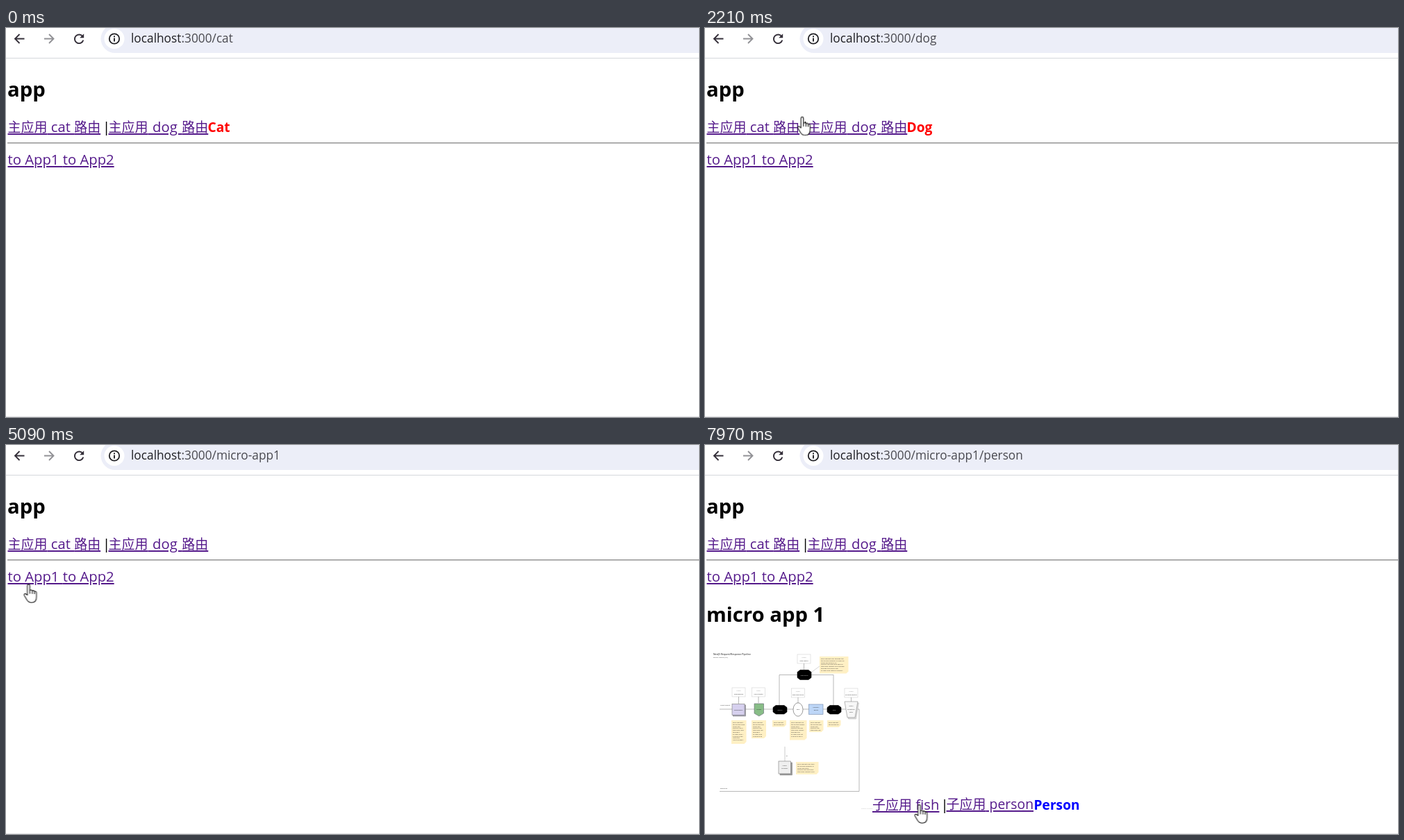
Write an HTML page that moves like this. It is 998x561 px and loops after 8000 ms.

```html
<!DOCTYPE html>
<html lang="zh-CN">
<head>
<meta charset="utf-8">
<title>micro app routes</title>
<style>
html, body { margin: 0; width: 100%; height: 100%; overflow: hidden; background: #fff; }
body { position: relative; color: #000; font-family: "Open Sans", "Noto Sans CJK SC", "Noto Sans CJK", sans-serif; }
svg { position: absolute; left: 0; top: 0; overflow: visible; }

/* --x is the left edge, --y the baseline */
.t {
  position: absolute; margin: 0; white-space: pre; line-height: 0;
  left: calc(var(--x) * 1px); top: calc(var(--y) * 1px - .388em);
  font-size: 20.3px; font-weight: 400;
}
.t i { font-style: normal; font-size: 19px; line-height: 0; }
.t a { color: #551a8b; text-decoration: underline 2px; text-underline-offset: 1.5px; }
h2.t { font-size: 29.3px; font-weight: 700; }
.url { --x: 180; --y: 22; font-size: 17.3px; color: #4a4a50; }
.url b { font-weight: 400; color: #1f1f23; }
.page { font-size: 19.2px; font-weight: 700; }
.red { color: #f00; }
.blue { color: #00f; }

.cat, .dog, .micro, .fish, .person, .child, a, #cursor, #cursor * { animation: 8s step-end infinite; }
.cat { animation-name: cat; }
.dog { animation-name: dog; }
.micro { animation-name: micro; }
.fish { animation-name: fish; }
.person { animation-name: person; }
.child { animation-name: child; }
#to-cat { animation-name: press-cat; }
#to-dog { animation-name: press-dog; }
#to-app1 { animation-name: press-app1; }
#to-person { animation-name: press-person; }

@keyframes cat { 0%, 33.6% { opacity: 1 } 24.05%, 46.1%, 100% { opacity: 0 } }
@keyframes dog { 0%, 33.6%, 59.6%, 100% { opacity: 0 } 24.05%, 46.1% { opacity: 1 } }
@keyframes micro { 0%, 67%, 100% { opacity: 0 } 59.6% { opacity: 1 } }
@keyframes fish { 0%, 95%, 100% { opacity: 0 } 67% { opacity: 1 } }
@keyframes person { 0% { opacity: 0 } 95%, 100% { opacity: 1 } }
@keyframes child { 0% { opacity: 0 } 65.3%, 100% { opacity: 1 } }
@keyframes press-cat { 31.8% { color: #f00 } 0%, 33.6%, 100% { color: #551a8b } }
@keyframes press-dog { 23.2%, 45.2% { color: #f00 } 0%, 24.05%, 46.1%, 100% { color: #551a8b } }
@keyframes press-app1 { 57.85% { color: #f00 } 0%, 59.6%, 100% { color: #551a8b } }
@keyframes press-person { 94.1% { color: #f00 } 0%, 95%, 100% { color: #551a8b } }

#cursor { position: absolute; left: 0; top: 0; animation-name: roam; }
#cursor .hand { animation-name: hand; }
#cursor .arrow { animation-name: arrow; }
@keyframes hand { 0%, 39%, 48%, 74.5%, 100% { opacity: 0 } 9.8%, 41.5%, 51.5%, 84.6% { opacity: 1 } }
@keyframes arrow { 0%, 39%, 48%, 74.5%, 100% { opacity: 1 } 9.8%, 41.5%, 51.5%, 84.6% { opacity: 0 } }
@keyframes roam {
  0% { opacity: 0; transform: translate(918px, 545px) }
  1.6% { opacity: 1; transform: translate(918px, 545px); animation-timing-function: steps(3) }
  4.35% { opacity: 1; transform: translate(330px, 240px); animation-timing-function: steps(3) }
  7.075% { opacity: 1; transform: translate(70px, 105px); animation-timing-function: steps(3) }
  9.8% { opacity: 1; transform: translate(35px, 125px); animation-timing-function: steps(2) }
  11.6% { transform: translate(60.5px, 142px) }
  12.5% { transform: translate(68.5px, 144px) }
  15.7% { transform: translate(72px, 144px); animation-timing-function: steps(4) }
  19.05% { transform: translate(136px, 144px); animation-timing-function: steps(4) }
  22.4% { transform: translate(178.5px, 139px) }
  25.85% { transform: translate(160px, 132px); animation-timing-function: steps(2) }
  27.85% { transform: translate(120px, 125px); animation-timing-function: steps(2) }
  29.85% { transform: translate(66.5px, 139px) }
  36.1% { transform: translate(75px, 143px); animation-timing-function: steps(2) }
  37.69% { transform: translate(92.5px, 146px); animation-timing-function: steps(3) }
  40.2% { transform: translate(150px, 172px); animation-timing-function: steps(3) }
  42.7% { transform: translate(187px, 150px) }
  47.2% { transform: translate(187px, 150px); animation-timing-function: steps(6) }
  52.81% { transform: translate(57.5px, 189px); animation-timing-function: steps(3) }
  55.2% { transform: translate(35.5px, 199px) }
  56.1% { transform: translate(32.5px, 201px) }
  74.5% { transform: translate(58px, 193px); animation-timing-function: steps(2) }
  76.06% { transform: translate(125px, 230px); animation-timing-function: steps(5) }
  80.45% { transform: translate(382px, 400px); animation-timing-function: steps(4) }
  83.85% { transform: translate(313px, 506px); animation-timing-function: steps(3) }
  86.35% { transform: translate(305.5px, 519px) }
  90.44% { transform: translate(326.5px, 519px); animation-timing-function: steps(3) }
  93.2% { transform: translate(400px, 518px) }
  96% { transform: translate(385px, 518px); animation-timing-function: steps(4) }
  99.56%, 100% { opacity: 1; transform: translate(308.5px, 519px) }
}
</style>
</head>
<body>
<svg width="998" height="561" fill="none">
  <path d="M998-5H157a20.5 20.5 0 0 0 0 41H998z" fill="#eceef8"/>
  <path d="M0 43.5H998" stroke="#d5d7dc"/>
  <path d="M0 560.5H998" stroke="#e4e4e6"/>
  <path d="M2 165.5H998" stroke="#939393"/>
  <path d="M2 166.5H998" stroke="#cacaca"/>
  <g stroke-width="1.9">
    <path d="M26.5 15.5H13.5M19.5 9l-6.5 6.5 6.5 6.5" stroke="#35303a"/>
    <path d="M55 15.5H68M62 9l6.5 6.5-6.5 6.5" stroke="#929296"/>
    <path d="M110.3 12.1a6.3 6.3 0 1 0 1 5.4" stroke="#35303a"/>
    <path d="M112.2 8.3v6h-6z" fill="#35303a"/>
  </g>
  <circle cx="156" cy="15.5" r="14.5" fill="#fff"/>
  <circle cx="156" cy="15.5" r="7.2" stroke="#202024" stroke-width="1.8"/>
  <path d="M156 14.5v5M156 11.2v2" stroke="#202024" stroke-width="1.9"/>
</svg>

<p class="t url cat"><b>localhost</b>:3000/cat</p>
<p class="t url dog"><b>localhost</b>:3000/dog</p>
<p class="t url micro"><b>localhost</b>:3000/micro-app1</p>
<p class="t url fish"><b>localhost</b>:3000/micro-app1/fish</p>
<p class="t url person"><b>localhost</b>:3000/micro-app1/person</p>

<h2 class="t" style="--x:2;--y:99">app</h2>
<p class="t" style="--x:2.5;--y:150"><a id="to-cat"><i>主应用</i> cat <i>路由</i></a></p>
<p class="t" style="--x:139;--y:150">|</p>
<p class="t" style="--x:147.5;--y:150;word-spacing:1.2px"><a id="to-dog"><i>主应用</i> dog <i>路由</i></a></p>
<p class="t page red cat" style="--x:290.5;--y:150">Cat</p>
<p class="t page red dog" style="--x:290.5;--y:150">Dog</p>
<p class="t" style="--x:2.5;--y:197"><a id="to-app1">to App1 </a><a>to App2</a></p>

<div class="child">
  <h2 class="t" style="--x:2;--y:255">micro app 1</h2>
  <svg id="chart" width="998" height="561" fill="none"></svg>
  <p class="t" style="--x:241;--y:526"><a><i>子应用</i> fish</a></p>
  <p class="t" style="--x:339.5;--y:526">|</p>
  <p class="t" style="--x:347.5;--y:526;font-size:19.4px"><a id="to-person"><i>子应用</i> person</a></p>
</div>
<p class="t page blue fish" style="--x:473.5;--y:526">Fish</p>
<p class="t page blue person" style="--x:473.5;--y:526">Person</p>

<svg id="cursor" width="30" height="30" fill="#fff" stroke="#111" stroke-width="1.1" stroke-linejoin="round">
  <path class="arrow" d="M.6.6V19l4.2-4 3.3 8.4 3.2-1.3-3.3-8h5.6z"/>
  <g class="hand" transform="translate(-7.8 -1)">
    <path d="M6 16.5V2.7a1.8 1.8 0 0 1 3.6 0V10c.5-1.4 3.2-1.4 3.6.6.6-1.2 2.9-1 3.2.9.8-.9 2.8-.4 2.8 1.6V19c0 5-2.6 8.3-7.2 8.3-3.6 0-5.4-1.9-7-4.6L1.6 17c-.9-1.7.9-3.3 2.4-2.1z"/>
    <path d="M9.6 10v4.5M13.2 10.8v4M16.4 11.6v3.4" fill="none"/>
  </g>
</svg>

<script>
const chart = document.getElementById('chart');
const words = 'each request runs through the bound handlers in order and returns a value to the next step'.split(' ');
const parts = [];

const label = (x, y, s, size = 2.3, fill = '#222', anchor = 'middle') =>
  parts.push(`<text x="${x}" y="${y}" font-size="${size}" fill="${fill}" text-anchor="${anchor}">${s}</text>`);
const path = (d, stroke = '#8a8a8a', fill = 'none', width = .6) =>
  parts.push(`<path d="${d}" stroke="${stroke}" fill="${fill}" stroke-width="${width}"/>`);
const box = (x, y, w, h, fill, stroke = '#777') =>
  parts.push(`<rect x="${x}" y="${y}" width="${w}" height="${h}" fill="${fill}" stroke="${stroke}" stroke-width=".6"/>`);

// Sticky note with a cut corner, filled with small lines of text
function note(x, y, w, h, rows) {
  path(`M${x} ${y}h${w}v${h - 3}l-3 3h${3 - w}z`, 'none', '#fff0c4');
  for (let i = 0; i < rows; i++) {
    const room = (w - 4) * (i % 3 === 2 ? .7 : 1) / 1.25;
    let s = '';
    for (let k = i * 4; s.length < room; k++) s += words[k % words.length] + ' ';
    label(x + 2, y + 4 + i * 2.8, s.slice(0, Math.floor(room)), 2.3, '#2a2a2a', 'start');
  }
}

// Captioned tag with a stem down to its node
function tag(x, y, name, stem) {
  box(x - 9.5, y, 19, 13, '#fff', '#d2d2d2');
  label(x, y + 4.5, '«class»', 2, '#888');
  label(x, y + 9.5, name, 2.4);
  path(`M${x} ${y + 13}v${stem}`);
}

// Black node with chamfered sides
function gate(x, y, w, h, name) {
  path(`M${x + 4} ${y}h${w - 8}l4 3v${h - 6}l-4 3h${8 - w}l-4-3v${6 - h}z`, '#000', '#000');
  label(x + w / 2, y + h / 2 + 1, name, 2.2, '#ddd');
}

label(12, 303, 'NestJS Request/Response Pipeline', 3.4, '#111', 'start');
label(12, 306.5, 'Express Platform (v10)', 2, '#333', 'start');
label(22, 376, 'Client request', 2.2, '#222', 'start');
label(22, 496, 'Response', 2.2, '#222', 'start');
label(225, 524.5, 'pipeline overview', 2, '#bbb', 'start');

path('M21 381H222V499.5H21');
path('M107 376V331.5H185V376');
path('M153 328L165 319', '#bbb');
path('M115 435V456', '#aaa');
label(118, 448.5, 'or', 2.3);

tag(142.5, 302, 'Interceptor', 9);
tag(48.5, 350, 'Middleware', 10);
tag(77, 350, 'CanActivate', 9);
tag(134, 351, 'PipeTransform', 8);
tag(210.5, 351, 'ExceptionFilter', 6);

gate(133, 324.5, 20, 14, 'Interceptor');
gate(98, 375.5, 20, 12.5, 'Before');
gate(176, 375.5, 20, 12.5, 'After');

box(40.5, 375, 18, 16, '#aaa8bd');
box(39, 373.5, 18, 16, '#d6d0ee');
label(48, 382.5, 'Middleware');
path('M71 373h13.5v14l-6.7 4-6.8-4z', '#667', '#88bd87');
label(77.7, 382, 'Guard');
parts.push('<ellipse cx="134" cy="381.5" rx="7" ry="9.7" fill="#fff" stroke="#555" stroke-width=".6"/>');
label(134, 382.3, 'Pipe');
box(149.5, 374, 20.5, 14.5, '#bdd6f7', '#6f86a8');
label(159.8, 379, '«handler»', 2);
label(159.8, 383, 'Route');
path('M202.5 372h19l-4 23h-11z', '#bbb', '#ddd');
path('M201 370h19l-4 23h-11z', '#888', '#f7f7f7');
label(210.5, 377, '«filter»', 2);
label(210.5, 381.5, 'Exception');
label(210.5, 385.5, 'Filter');
box(108, 458, 17.5, 18, '#999', '#888');
box(106, 456, 17.5, 18, '#efefef');
label(114.7, 463, '«class»', 2);
label(114.7, 467, 'Provider');

note(165, 305, 41.5, 24.5, 7);
note(38, 397, 21.5, 34, 10);
note(67, 397, 21, 26, 8);
note(97, 397, 20, 9.5, 2);
note(122, 397, 24.5, 28.5, 8);
note(150, 397, 20.5, 17, 5);
note(176, 397, 19.5, 10, 2);
note(131, 457, 32.5, 18, 5);

chart.innerHTML = parts.join('');
</script>
</body>
</html>
```
